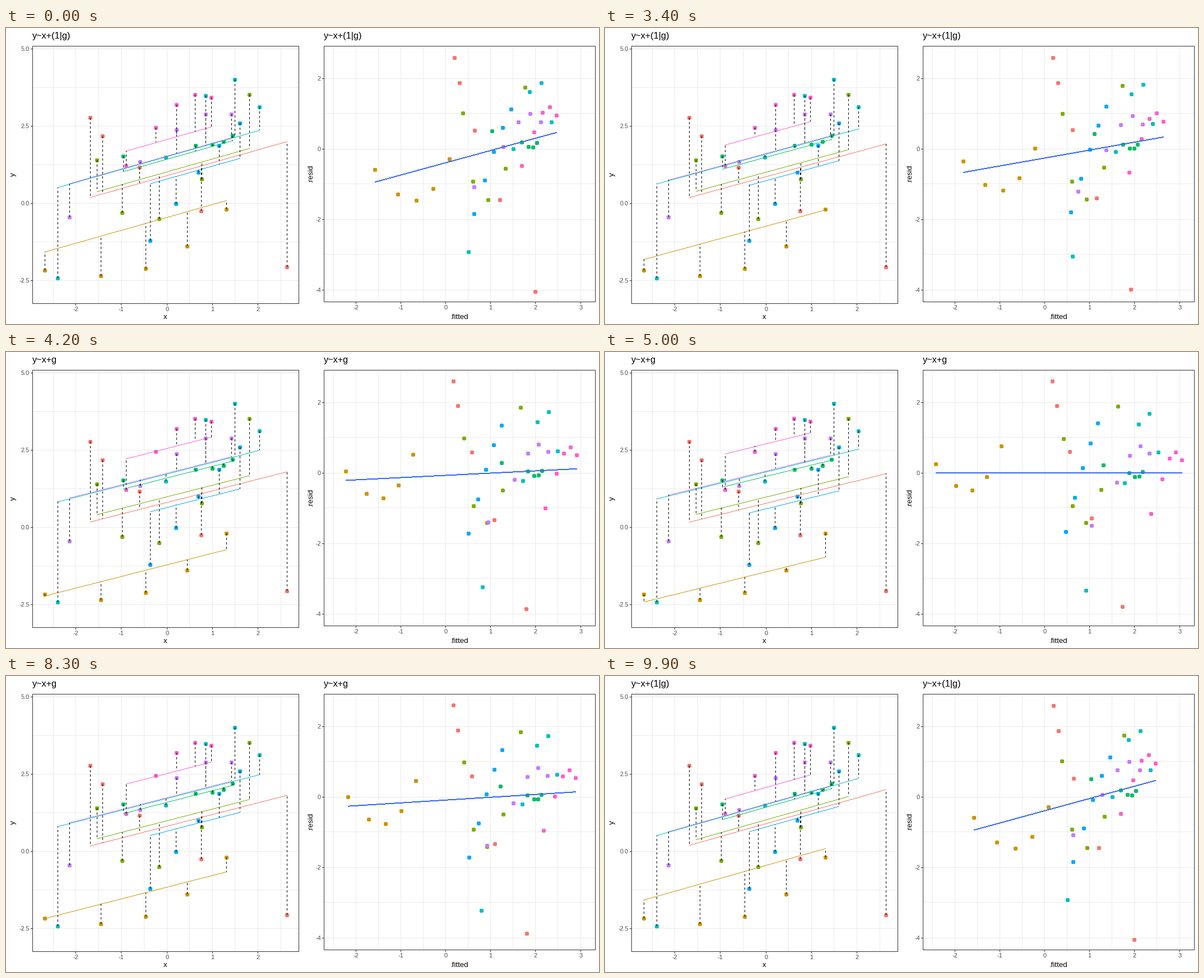
These frames come from a looping animation (1058x529 px, 10000 ms). A matplotlib script:

```python
import numpy as np
import matplotlib.pyplot as plt
from matplotlib.animation import FuncAnimation
from matplotlib.collections import LineCollection
from matplotlib.patches import Rectangle

W, H, DPI = 1058, 529, 100
PX = 72 / DPI  # points per pixel
FRAMES, STEPS = 100, 25

plt.rcParams["font.family"] = "Liberation Sans"

# Group: colour, first x, last x, pace between them, level, tilt, bend
GROUPS = [("#F8766D", -1.68, 2.64, 2, 0.78, -1.6, -0.3),
          ("#CD9600", -2.68, 1.31, 0.85, -1.44, 0.13, 0.25),
          ("#7CAE00", -1.53, 1.81, 1.3, 0.98, 0.23, 0.71),
          ("#00BE67", -0.95, 1.45, 0.3, 1.65, -0.05, 0.06),
          ("#00BFC4", -2.40, 2.04, 0.45, 1.79, 0.98, -0.69),
          ("#00A9FF", -0.36, 1.60, 0.9, 0.60, 0.77, -0.07),
          ("#C77CFF", -2.14, 1.42, 0.6, 1.82, 0.51, -0.24),
          ("#FF61CC", -0.90, 0.98, 0.75, 2.70, 0.38, -0.2)]
COLORS = [g[0] for g in GROUPS]
SIZE = 5

FIXED_SLOPE, MIXED_SLOPE = 0.363, 0.417
GRAND, SHRINK = 1.08, 0.6085      # mixed model pulls levels to the mean
TREND = (0.348, -0.402)           # residuals on fitted, mixed model


def pixel(v):
    """Centre of the pixel nearest to v."""
    return np.round(v) + 0.5


class Panel:
    """Maps data values to stage pixels and draws the plot frame."""

    def __init__(self, box, x0, sx, y0, sy):
        self.box, self.x0, self.sx, self.y0, self.sy = box, x0, sx, y0, sy

    def px(self, x):
        return self.x0 + self.sx * np.asarray(x)

    def py(self, y):
        return self.y0 - self.sy * np.asarray(y)

    def frame(self, xgrid, ygrid, xticks, yticks, yfmt, label_y):
        l, t, r, b = self.box
        for x in pixel(self.px(xgrid)):
            line([x, x], [t, b], "#EBEBEB")
        for y in pixel(self.py(ygrid)):
            line([l, r], [y, y], "#EBEBEB")
        for x in xticks:
            p = pixel(self.px(x))
            line([p, p], [b, b + 4], "#333333")
            label(p, label_y, str(x), 11, "#4D4D4D", "center")
        for y in yticks:
            p = pixel(self.py(y))
            line([l - 3, l], [p, p], "#333333")
            label(l - 5, p + 3.5, yfmt % y, 11, "#4D4D4D", "right")
        ax.add_patch(Rectangle((l + 0.5, t + 0.5), r - l, b - t, fill=False,
                               ec="#333333", lw=PX, snap=False, zorder=6))


def line(x, y, color):
    ax.plot(x, y, color=color, lw=PX, snap=False, solid_capstyle="butt")


def label(x, y, s, size, color="black", ha="left", rot=0):
    return ax.text(x, y, s, fontsize=size * PX, color=color, ha=ha,
                   va="baseline", rotation=rot, rotation_mode="anchor",
                   zorder=7)


def dots(x, y):
    return ax.scatter(pixel(x), pixel(y), s=(6.4 * PX) ** 2, linewidths=0,
                      c=np.repeat(COLORS, SIZE), antialiased=False, zorder=2)


def strokes(color, z, width=1, style="solid"):
    lines = LineCollection([], colors=color, linewidths=width * PX,
                           linestyles=[style], snap=False, zorder=z)
    return ax.add_collection(lines, autolim=False)


def stairs(x, y, width=1):
    """Hard-edged slanted line: one short dash per pixel column."""
    cols = np.arange(round(x[0]), round(x[1]) + 1)
    rows = np.round(np.interp(cols, x, y)) + width % 2 / 2
    return np.stack([np.c_[cols, rows], np.c_[cols + 1, rows]], axis=1)


fig = plt.figure(figsize=(W / DPI, H / DPI), dpi=DPI, facecolor="white")
ax = fig.add_axes([0, 0, 1, 1])
ax.set(xlim=(0, W), ylim=(H, 0))
ax.axis("off")

left = Panel((47, 32, 522, 492), 286.6, 81.2, 313, 55.27)
right = Panel((567, 32, 1051, 489), 784, 80.2, 215.5, 63)

left.frame(np.arange(-2.5, 2.6, 0.5), np.arange(-2.5, 5.1, 1.25),
           range(-2, 3), [-2.5, 0, 2.5, 5], "%.1f", 506)
right.frame(np.arange(-2.5, 3.1, 0.5), np.arange(-4, 3),
            range(-2, 4), [-4, -2, 0, 2], "%d", 503)
label(284.5, 520, "x", 13.3, ha="center")
label(809, 520, ".fitted", 13.3, ha="center")
label(16, 262, "y", 13.3, ha="center", rot=90)
label(547, 260, ".resid", 13.3, ha="center", rot=90)
titles = [label(x, 19, "", 16.2) for x in (47, 567)]

# Five observations per group along a tilted, bent curve
first, last, pace, level, tilt, bend = np.array(
    [g[1:] for g in GROUPS]).T[:, :, None]
t = np.linspace(0, 1, SIZE)
u = 4 * t - 2
x = first + (last - first) * t ** pace
fixed = level + FIXED_SLOPE * x
mixed = GRAND + SHRINK * (level - GRAND) + MIXED_SLOPE * x
y = fixed + tilt * u + bend * (u * u - 2)

x_px, y_px = left.px(x), left.py(y)
dots(x_px, y_px)
resids = dots(x_px, y_px)
fits = [strokes(c, 3) for c in COLORS]
smooth = strokes("#3366FF", 4, 2)
drops = strokes("black", 4, style=(0, (4, 4)))


def progress(i):
    """Share of the fixed model: hold, change, hold, change back."""
    if i < 50:
        return max(0, i - 25) / STEPS
    return 1 - max(0, i - 74) / STEPS


def update(i):
    p = progress(i)
    e = (1 - np.cos(np.pi * p)) / 2
    fit = mixed + (fixed - mixed) * e
    fit_px = left.py(fit)
    for f, fx, fy in zip(fits, x_px, fit_px):
        f.set_segments(stairs(fx[[0, -1]], fy[[0, -1]]))
    drops.set_segments([[(a, b), (a, c)] for a, b, c in
                        zip(pixel(x_px).flat, np.round(y_px).flat,
                            np.round(fit_px).flat)])
    resids.set_offsets(pixel(np.c_[right.px(fit).ravel(),
                                   right.py(y - fit).ravel()]))

    start = np.array([mixed.min(), mixed.max()])
    ends = np.array([fit.min(), fit.max()])
    trend = np.polyval(TREND, start) * (1 - e)
    smooth.set_segments(stairs(right.px(ends), right.py(trend), 2))
    for title in titles:
        title.set_text("y~x+g" if p > 0.5 else "y~x+(1|g)")
    return [*fits, resids, drops, smooth, *titles]


anim = FuncAnimation(fig, update, frames=FRAMES, interval=100, repeat=True,
                     init_func=lambda: update(0), blit=False)
plt.show()
```
